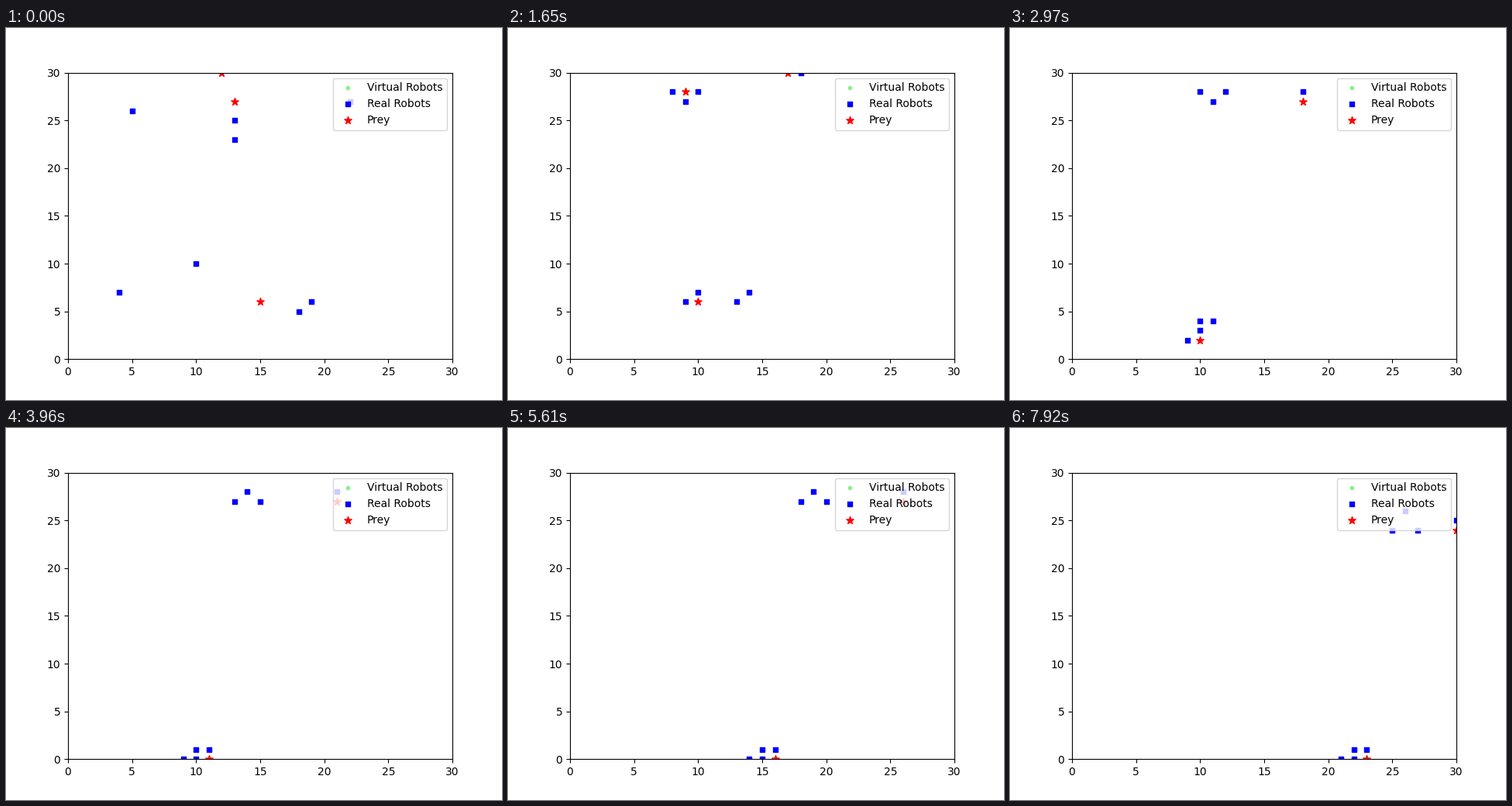
Write a matplotlib script that moves like this. It is 640 px wide and 480 px high and loops after 8 s.

```python
import matplotlib.pyplot as plt
import numpy as np
from matplotlib.animation import FuncAnimation

LOOP, TICK, STEP = 8000, 40, 330  # ms
SIZE = 30

COMPASS = {"N": (0, 1), "S": (0, -1), "E": (1, 0), "W": (-1, 0)}


def heading(name):
    """Grid move for a compass name; O waits, X leaves the field."""
    if name == "X":
        return np.full(2, np.nan)
    return np.sum([COMPASS.get(c, (0, 0)) for c in name], axis=0)


def walk(x, y, route):
    """Cell at every step for a route such as '5E 3S'."""
    cells = [np.array([x, y], float)]
    for leg in route.split():
        name = leg.lstrip("0123456789")
        for _ in range(int(leg[:-len(name)])):
            cells.append(cells[-1] + heading(name))
    return cells


def team(*members):
    return np.array([walk(*m) for m in members]).swapaxes(0, 1)


robots = team(
    (5, 26, "1NE 2E 1O 3N 3SE 11E 3SE"),
    (13, 25, "1NW 1N 2W 3N 3SE 11E 3SE"),
    (13, 23, "3NW 1W 3N 2SE 1NE 12E 2SE"),
    (22, 27, "3NW 1W 1O 1W 2S 13E 3S"),
    (10, 10, "2SE 1S 2W 7S 12E"),
    (4, 7, "1SE 4E 6S 1O 12E"),
    (18, 5, "1NW 5W 1SW 1W 4S 12E"),
    (19, 6, "1NW 5W 2SW 4S 12E"),
)
prey = team(
    (12, 30, "5E 3S 13E 3S"),
    (13, 27, "4W 3N 17X"),
    (15, 6, "5W 6S 13E"),
)

fig, ax = plt.subplots(figsize=(6.4, 4.8), dpi=100)
ax.set(xlim=(0, SIZE), ylim=(0, SIZE))
ax.scatter([], [], s=10, c="lightgreen", marker="o", label="Virtual Robots")
robot_dots = ax.scatter([], [], s=20, c="blue", marker="s", label="Real Robots")
prey_dots = ax.scatter([], [], s=50, c="red", marker="*", label="Prey")
ax.legend(loc="upper right")


def update(i):
    # the grid advances on the tick nearest below each step boundary
    step = min((i * TICK + TICK - 10) // STEP, len(robots) - 1)
    robot_dots.set_offsets(robots[step])
    here = prey[step]
    prey_dots.set_offsets(here[~np.isnan(here[:, 0])])
    return robot_dots, prey_dots


anim = FuncAnimation(fig, update, frames=LOOP // TICK, interval=TICK,
                     init_func=lambda: update(0), repeat=True, repeat_delay=0)
plt.show()
```
